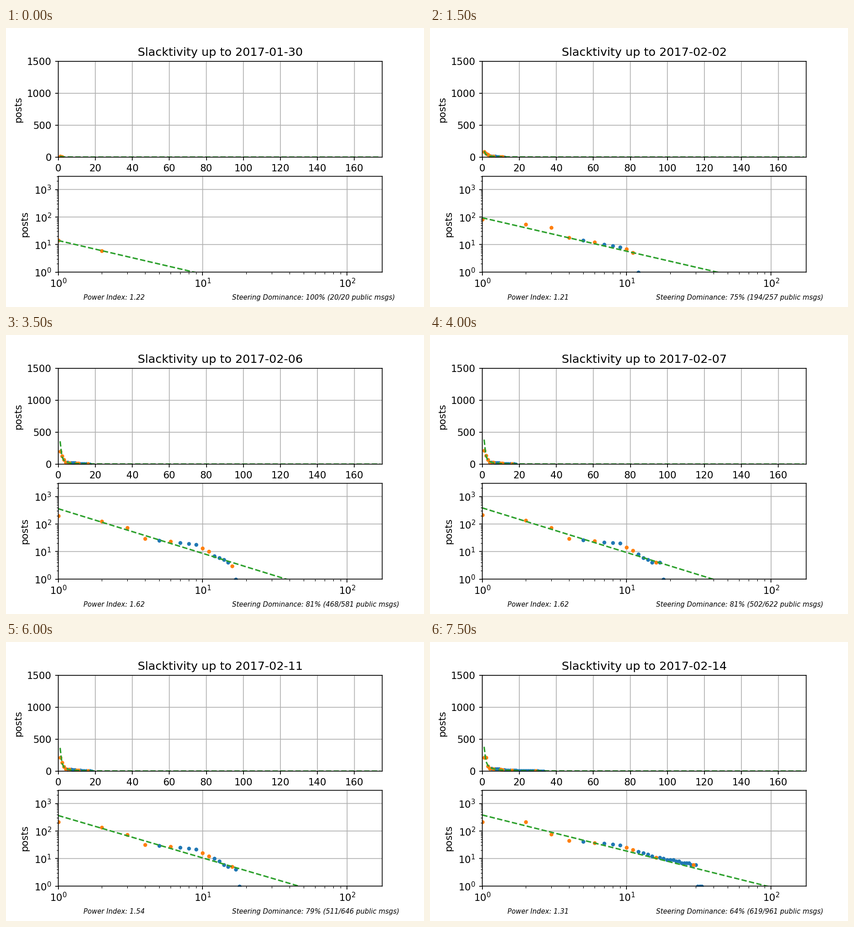
Recreate the animation shown at these times as a matplotlib script. Size 917 px wide and 611 px high, loop 8000 ms.

```python
import matplotlib.pyplot as plt
import numpy as np
from matplotlib.animation import FuncAnimation

plt.rcParams["path.snap"] = False

DAYS = 16
RANKS = np.arange(1, 175)
STEERING = (1, 2, 3, 4, 6, 10, 11, 16, 29)

# Everything below is known on these days and blended in between.
KEY_DAYS = (0, 2, 5, 8, 10, 15)
INDEX = (1.22, 1.01, 1.62, 1.62, 1.54, 1.31)
LED = (20, 91, 401, 502, 511, 619)
TOTAL = (20, 136, 500, 622, 644, 961)
REGULARS = (2, 9, 15, 17, 17, 30)
POSTS_AT_RANK = {
    1: (14, 40, 162, 214, 214, 215),
    2: (6, 26, 111, 134, 135, 212),
    3: (5, 25, 73, 73, 73, 75),
    4: (4, 12, 29, 29, 32, 45),
    9: (2, 5, 14, 20, 22, 31),
    15: (1, 3, 3, 4, 5, 12),
}


def blend(day, values):
    """Value on a day; posting almost stops over the quiet weekend."""
    clock = np.interp(day, (0, 10, 11, 12, 15), (0, 10, 10.04, 10.04, 15))
    return np.interp(clock, KEY_DAYS, values)


def ranked_posts(day):
    """Power-law pieces through the known ranks, then one-post newcomers."""
    regulars = int(blend(day, REGULARS))
    knots = [blend(day, track) for track in POSTS_AT_RANK.values()]
    ranks = list(POSTS_AT_RANK) + [30]
    knots.append(knots[-1] / 2)
    log_posts = np.interp(np.log(np.arange(1, regulars + 1)),
                          np.log(ranks), np.log(knots))
    return np.append(np.rint(np.exp(log_posts)), np.ones(regulars // 10))


def date_of(day):
    return f"2017-01-{30 + day}" if day < 2 else f"2017-02-{day - 1:02d}"


fig, (top, low) = plt.subplots(2, 1, figsize=(6, 4), dpi=152.84)
fig.subplots_adjust(left=0.125, right=0.9, bottom=0.125, top=0.88, hspace=0.2)

low.set_xscale("log")
low.set_yscale("log")
top.set(xlim=(0, 175), ylim=(0, 1500),
        xticks=range(0, 161, 20), yticks=range(0, 1501, 500))
low.set(xlim=(1, 175), ylim=(1, 3000))
low.tick_params(axis="x", pad=2)

plots = []
for ax, pad in ((top, 4), (low, 5)):
    ax.set_ylabel("posts", labelpad=pad)
    ax.grid(True)
    others, = ax.plot([], [], ".", color="C0")
    steering, = ax.plot([], [], ".", color="C1")
    trend, = ax.plot([], [], color="C2", linestyle=(0, (3.67, 1.59)))
    plots.append((others, steering, trend))

title = top.set_title("")
index_text = low.text(1.5, 0.1, "", size=7, style="italic")
share_text = low.text(16, 0.1, "", size=7, style="italic")


def update(day):
    posts = ranked_posts(day)
    ranks = np.arange(1, len(posts) + 1)
    mask = np.isin(ranks, STEERING)

    index = blend(day, INDEX)
    height = np.exp(np.mean(np.log(posts) + index * np.log(ranks)))
    for others, steering, trend in plots:
        others.set_data(ranks[~mask], posts[~mask])
        steering.set_data(ranks[mask], posts[mask])
        trend.set_data(RANKS, height * RANKS ** -index)

    led, total = int(blend(day, LED)), int(blend(day, TOTAL))
    title.set_text(f"Slacktivity up to {date_of(day)}")
    index_text.set_text(f"Power Index: {index:.2f}")
    share_text.set_text(f"Steering Dominance: {100 * led / total:.0f}% "
                        f"({led}/{total} public msgs)")
    return []


anim = FuncAnimation(fig, update, frames=DAYS, interval=500,
                     repeat=True, repeat_delay=0, blit=False)
plt.show()
```
